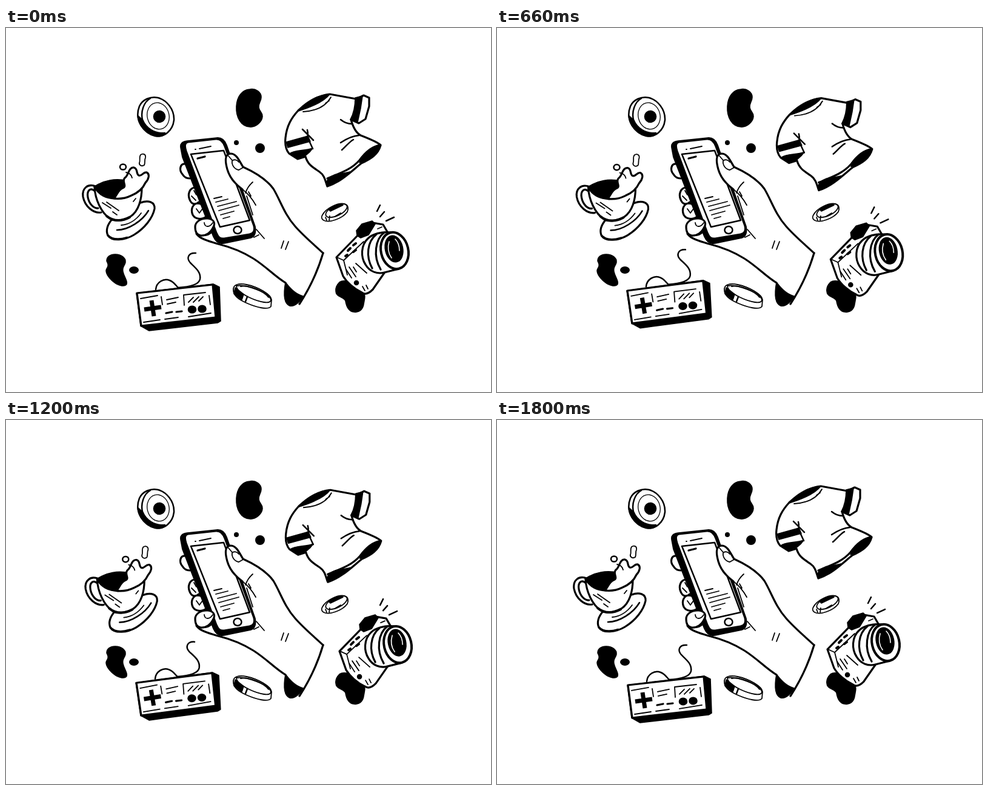
Write an HTML page that moves like this. It is 800 px wide and 600 px high and loops after 1.83 s.

```html
<!DOCTYPE html>
<html lang="en">
<head>
<meta charset="utf-8">
<title>Floating purchases</title>
<style>
  html, body { margin: 0; width: 100%; height: 100%; overflow: hidden; background: #fff; }
  svg { display: block; width: 100vw; height: 100vh; }
  path, ellipse { fill: none; stroke: #000; stroke-width: 3.2; stroke-linecap: round; stroke-linejoin: round; }
  .ink { fill: #000; stroke-width: 1.6; }
  .paper { fill: #fff; }
  .thin { stroke-width: 1.8; }
  .mid { stroke-width: 2.5; }
  .bold { stroke-width: 4; }
</style>
</head>
<body>
<svg viewBox="0 0 800 600">
  <!-- loose blobs -->
  <path class="ink" d="M402 101C412 99 421 106 421 114C421 121 416 124 417 131C418 138 423 138 423 146C422 156 411 164 402 163C388 162 379 148 380 129C381 113 389 102 402 101Z"/>
  <ellipse class="ink" cx="380" cy="189" rx="3.2" ry="3.2"/>
  <ellipse class="ink" cx="419" cy="198" rx="7.2" ry="7.2"/>
  <path class="ink" d="M180 373C190 373 198 379 197 386C196 392 191 394 193 402C195 411 201 417 199 422C196 427 185 425 178 419C168 411 163 402 166 397C170 392 168 388 166 384C166 377 172 373 180 373Z"/>
  <ellipse class="ink" cx="211" cy="399" rx="7.2" ry="5.2"/>
  <path class="ink" d="M550 419C556 415 566 417 571 422C576 428 583 428 589 434C594 441 591 448 590 455C589 464 582 470 573 468C563 466 561 456 560 450C558 443 544 444 544 434C543 427 547 422 550 419Z"/>

  <!-- upright coin -->
  <path class="paper mid" d="M220 129C225 118 238 112 251 115C265 119 278 134 277 152C275 169 261 181 246 178C227 173 211 152 220 129Z"/>
  <path class="ink" d="M217 144C218 160 230 174 246 178C253 179 258 178 262 175C243 173 228 164 224 150Z"/>
  <path class="mid" d="M238 116C227 122 222 138 225 151C231 166 246 175 262 173"/>
  <ellipse cx="251" cy="145" rx="18" ry="22" transform="rotate(-14 251 145)" style="stroke-width:1.3"/>
  <ellipse class="ink" cx="253" cy="146" rx="9.5" ry="9.5"/>

  <!-- tilted small coin -->
  <path class="paper thin" d="M522 308C528 297 548 287 559 290C565 292 565 298 563 303C555 314 533 322 524 317C520 315 520 311 522 308Z"/>
  <ellipse class="thin" cx="545" cy="301" rx="19" ry="8.5" transform="rotate(-25 545 301)"/>
  <path class="ink" d="M532 299L550 290L556 292L535 302Z"/>
  <path class="thin" d="M527 312L529 317M534 310L533 317M542 311L552 305"/>

  <!-- lower coin -->
  <path class="paper thin" d="M375 432C374 423 384 420 397 423C416 427 437 439 438 448L437 459C432 465 414 461 396 453C383 447 375 441 375 432Z"/>
  <path class="thin" d="M380 425C395 422 434 436 437 448C437 456 418 452 401 444C389 438 380 431 380 425Z"/>
  <path class="thin" d="M387 426C401 423 426 434 433 444"/>
  <path class="ink" d="M378 428L392 439L389 448L376 438Z"/>
  <path class="mid" d="M398 443L395 451"/>

  <!-- hand behind the phone -->
  <path class="paper" d="M296 224C287 223 285 234 291 241C294 246 299 248 303 248"/>
  <path class="paper" d="M312 263C303 263 299 274 303 283C306 291 313 292 318 287"/>
  <path class="paper" d="M317 289C308 289 304 299 308 308C313 317 327 316 332 309C334 301 327 290 317 289Z"/>
  <path class="thin" d="M306 277L313 284M314 298L319 305L324 298M310 268L314 275"/>
  <path d="M314 339C320 348 336 352 350 356C374 362 392 370 408 380C430 394 443 409 461 420"/>
  <path class="ink" d="M461 419C458 436 457 454 468 458C478 460 485 450 490 442C478 439 469 430 461 419Z"/>
  <path d="M523 371C515 398 503 426 484 455"/>

  <!-- phone -->
  <path class="ink" d="M288 197C287 190 291 187 299 186L347 181C356 180 361 185 364 193L411 327C413 338 410 344 404 346L360 355C351 357 346 353 342 344L291 213Z"/>
  <path class="paper" d="M300 188L346 183C354 182 358 187 361 195L409 326C411 334 408 339 402 340L360 347C353 348 350 345 347 338L297 203C294 194 295 189 300 188Z"/>
  <path class="mid" d="M305 208L359 202L402 317L353 328Z"/>
  <path class="thin" d="M319 199L338 195M312 200L313 200"/>
  <path d="M316 215L328 212"/>
  <path class="thin" d="M343 281L356 278M346 287L366 282M349 294L380 286M351 301L384 292M354 308L376 302M358 314L369 311"/>
  <ellipse class="mid" cx="382" cy="333" rx="6.5" ry="6"/>

  <!-- hand in front of the phone -->
  <path class="paper" d="M312 328C312 319 322 313 333 314C342 315 346 321 342 328C338 337 330 343 321 342C315 341 312 336 312 328Z"/>
  <path class="thin" d="M327 321C328 329 336 329 341 321M329 342C335 341 339 338 341 334"/>
  <path class="paper" d="M390 266C379 258 369 247 365 233C361 219 361 208 370 207C381 207 385 220 391 229C413 239 431 251 441 265C452 283 459 307 477 327C491 343 508 357 523 371"/>
  <path class="thin" d="M373 219C372 226 377 233 384 234L391 230M373 219C376 216 381 217 384 221M367 211L373 218"/>
  <path class="thin" d="M390 266C398 272 406 281 412 292M407 254C401 259 397 266 395 272M397 277L407 308M413 332L426 347M409 345L417 341M400 270L404 277"/>
  <path class="thin" d="M458 351L454 363M466 352L461 365"/>

  <g id="shirt">
    <path class="paper" d="M534 109L578 117L590 111L599 115L599 129L593 150L582 157L569 151C572 162 576 172 585 177C600 183 611 187 618 193C614 208 602 216 586 223C570 236 552 254 530 261C527 254 526 243 517 237C507 230 498 226 494 212L481 216L467 207C461 200 460 190 461 181C463 161 471 148 482 136C498 121 516 111 534 109Z"/>
    <path class="ink" d="M482 137C494 121 516 110 534 109C526 120 508 129 482 137Z"/>
    <path class="thin" d="M490 138C509 137 527 130 536 114M527 124L533 120"/>
    <path class="ink" d="M576 115L588 112L585 132L580 155L568 151C574 140 576 128 576 115Z"/>
    <path class="ink" d="M462 188L498 178L502 187L465 197Z"/>
    <path class="ink" d="M468 207C477 200 492 203 506 198C500 207 492 213 481 216Z"/>
    <path class="mid" d="M506 199L500 186M489 167L507 185M497 168C499 175 498 180 495 186"/>
    <path class="ink" d="M583 222C588 208 603 194 618 193C613 208 600 216 583 222Z"/>
    <path class="ink" d="M529 260C527 251 532 246 542 242C551 239 559 240 567 237C556 248 543 257 529 260Z"/>
    <path d="M530 248C552 239 570 233 583 218C593 204 604 195 617 193"/>
    <path class="mid" d="M552 189C561 183 570 178 582 177M554 201C561 195 567 187 573 184M552 151C558 156 564 158 570 158"/>
  </g>

  <g id="cup">
    <path class="paper" d="M222 288C235 283 246 287 245 298C242 313 229 330 211 341C196 350 175 352 168 342C164 333 168 323 176 314"/>
    <path class="mid" d="M183 333C202 333 225 318 235 301M168 341C176 350 190 348 200 345"/>
    <path class="thin" d="M190 325C203 324 215 316 223 305"/>
    <path class="paper" d="M148 261C135 256 125 264 127 278C130 294 144 306 157 304"/>
    <path d="M147 269C139 262 133 268 135 279C137 290 145 298 152 297"/>
    <path class="paper" d="M146 262C147 283 157 304 171 314C180 320 194 317 205 311C219 302 224 282 224 263C208 248 165 249 146 262Z"/>
    <path class="bold" d="M166 310C178 320 193 318 204 312"/>
    <path class="ink" d="M146 262C160 251 181 247 201 252C196 266 187 277 177 281C163 279 152 273 146 262Z"/>
    <path class="paper" d="M178 281C184 274 185 267 192 264C201 261 190 253 196 247C202 244 202 229 211 230C218 232 214 240 219 243C224 245 226 237 232 238C238 241 235 250 230 255C226 264 219 271 207 276C197 281 187 282 178 281Z"/>
    <path d="M146 262C154 276 166 281 181 281"/>
    <path class="thin" d="M159 288L173 297M166 287L186 301M176 303L183 308M210 286L214 281M198 238C203 239 207 242 208 247"/>
    <ellipse class="paper mid" cx="193" cy="229" rx="5" ry="4.6"/>
    <path class="thin" d="M222 209C226 206 231 208 230 214C228 217 230 222 228 226C224 229 219 226 220 222C222 218 219 213 222 209Z"/>
  </g>

  <g id="camera">
    <path class="paper" d="M545 378L581 341L605 321L622 324L629 336L628 398L605 431C598 438 592 440 587 436C574 430 562 419 556 409Z"/>
    <path class="ink" d="M578 334L587 323L604 318L609 323L598 341L585 346L579 342Z"/>
    <path class="thin" d="M557 383L590 352M557 383L563 407M546 378L557 383M613 331L620 328"/>
    <path class="bold" d="M564 367L568 363M573 358L577 355M573 369L577 366M560 376L563 374"/>
    <path class="thin" d="M561 398L570 412M566 394L577 410M573 394L578 402M588 426L592 433M594 424L597 430M577 388L595 404"/>
    <ellipse class="ink" cx="578" cy="420" rx="3.5" ry="3.5"/>
    <path class="paper" d="M636 337C619 335 604 340 597 347C585 358 585 378 593 390C600 402 613 406 624 403L648 397Z"/>
    <path d="M611 340C596 352 593 376 604 396M624 337C609 348 605 376 618 398"/>
    <ellipse class="paper bold" cx="641" cy="367" rx="22.5" ry="30.5" transform="rotate(-13 641 367)"/>
    <ellipse class="ink" cx="640" cy="364" rx="14.5" ry="22" transform="rotate(-12 640 364)"/>
    <path d="M632 352C629 362 631 372 636 379M642 348C647 353 649 360 649 367" style="stroke:#fff;stroke-width:1.6"/>
    <path class="mid" d="M612 302L617 292M617 311L624 303M627 318L640 312"/>
  </g>

  <g id="pad">
    <path class="mid" d="M247 431C248 419 260 412 270 416C278 419 280 425 284 428"/>
    <path class="mid" d="M284 428C301 427 318 424 320 414C322 402 312 395 304 387C297 379 301 370 313 371"/>
    <path class="ink" d="M215 437L342 422L352 427L354 483L349 486L236 499L222 491Z"/>
    <path class="paper" d="M216 437L341 423L346 477L223 491Z"/>
    <path d="M228 464L256 460M240 449L244 475" style="stroke-width:7;stroke-linecap:butt"/>
    <ellipse class="ink" cx="307" cy="464" rx="6.5" ry="5.7"/>
    <ellipse class="ink" cx="323.5" cy="463" rx="6.5" ry="5.7"/>
    <path d="M264 470L274 468M281 468L290 467"/>
    <path class="thin" d="M222 446L250 441M256 443L258 456M265 448L284 444M266 455L280 452M294 457L293 440L329 436M301 452L309 444M309 452L318 443M318 450L325 443M227 485L254 481M262 480L284 477M301 476L338 470M335 441L337 456"/>
  </g>
</svg>
<script>
  const LOOP = 1830, STEP = 30;

  // Offset at the far end of the drift, plus an optional turn about a point.
  const drifts = [
    { id: 'shirt', dx: 1, dy: 8 },
    { id: 'cup', dx: 5.5, dy: 0.7 },
    { id: 'camera', dx: 6.5, dy: 4 },
    { id: 'pad', dx: -0.7, dy: -6.3, turn: -1.2, pivot: '285 460' }
  ].map(d => ({ ...d, node: document.getElementById(d.id) }));

  // Time advances in even steps, holding every sixth one.
  function heldTime(ms) {
    const step = Math.floor((ms % LOOP) / STEP);
    return (step % 6 === 1 ? step - 1 : step) * STEP;
  }

  function draw(ms) {
    const swing = (1 - Math.cos(2 * Math.PI * heldTime(ms) / LOOP)) / 2;
    for (const { node, dx, dy, turn = 0, pivot = '0 0' } of drifts) {
      node.setAttribute('transform',
        `translate(${dx * swing} ${dy * swing}) rotate(${turn * swing} ${pivot})`);
    }
  }

  const start = performance.now();
  function tick() {
    draw(performance.now() - start);
    requestAnimationFrame(tick);
  }
  tick();
</script>
</body>
</html>
```
